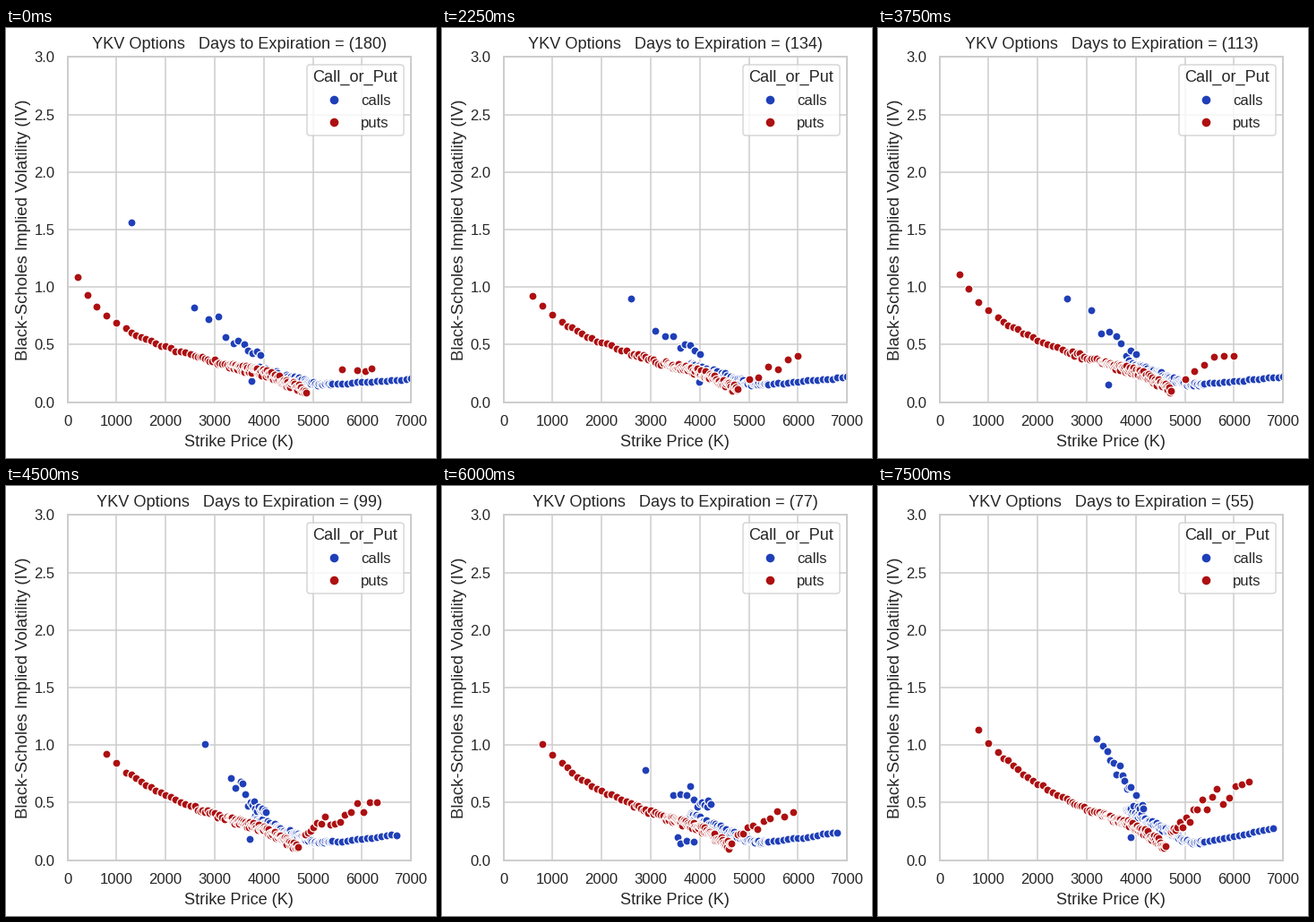
Animation, 480 px wide and 480 px high, one loop 8 s. Source, as a matplotlib script:

```python
import numpy as np
import matplotlib.pyplot as plt
from matplotlib.animation import FuncAnimation
from matplotlib.lines import Line2D

BLUE, RED, INK, GRID = "#1f3fb8", "#ad1011", "0.15", "0.8"
U = 1.086  # style scale in points
STEP_MS, HOLD, FRAMES = 250, 3, 32
SPOT = 4700


def ladder(start, *rungs, thin=1):
    """Strikes from start; each rung is (upper limit, step)."""
    parts = []
    for limit, step in rungs:
        part = np.arange(start, limit, step * thin)
        if part.size:
            parts.append(part)
            start = part[-1] + step * thin
    return np.concatenate(parts)


def jitter(rng, k, far, near):
    """Quotes scatter more as strikes approach the money."""
    size = np.interp(k, (2500, 4000), (far, near))
    return size * rng.uniform(-1, 1, k.size)


def put_skew(rng, left, start, thin):
    top = 4500 + 2.1 * left
    k = ladder(start, (1200, 200), (2600, 100), (3300, 50), (top, 18), thin=thin)
    x = np.log(SPOT / k)
    slope = 0.345 * (180 / left) ** 0.42
    dip = 0.09 * np.clip((k - 4000) / (top - 4000), 0, 1)
    return k, 0.2 + slope * x - 0.021 * x**2 - dip + jitter(rng, k, 0.012, 0.034)


def call_smile(rng, left, end, thin):
    k = ladder(3800, (5000, 20), (5400, 25), (end + 1, 100), thin=thin)
    falling = 0.115 * (180 / left) ** 0.6 * np.clip((5050 - k) / 1000, 0, None)
    rising = 0.04 * 180 / left * (np.clip(k - 5300, 0, None) / 1600) ** 1.2
    size = np.interp(k, (4600, 5500), (0.024, 0.005))
    return k, 0.157 + falling + rising + size * rng.uniform(-1, 1, k.size)


def arc(rng, n, k0, v0, k1, v1, crowd):
    """Stray quotes from one point to another; crowd < 1 packs the far end."""
    t = np.linspace(0, 1, n) ** crowd
    k = np.round((k0 + (k1 - k0) * t) / 25) * 25
    v = v1 + (v0 - v1) * (1 - t) ** 1.3
    rough = 0.12 * np.sin(np.pi * t) ** 0.5
    return k, v * (1 + rough * rng.uniform(-1.5, 1.5, n))


def by_strike(*parts):
    pts = np.hstack(parts).T
    return pts[np.argsort(pts[:, 0], kind="stable")]


def day(left, start, end=7000, thin=1, lows=1,
        high=(9, 2600, 0.9, 4000, 0.42, 0.5),
        wing=(6, 5000, 0.2, 6000, 0.4, 1)):
    rng = np.random.default_rng(left)
    low = rng.uniform(3400, 4000, lows), rng.uniform(0.14, 0.21, lows)
    calls = by_strike(call_smile(rng, left, end, thin), arc(rng, *high), low)
    puts = by_strike(put_skew(rng, left, start, thin), arc(rng, *wing))
    return left, calls, puts


days = [
    day(180, 200, high=(12, 1300, 1.56, 3920, 0.41, 0.3),
        wing=(4, 5600, 0.283, 6200, 0.293, 0.6)),
    day(168, 200),
    day(155, 200, lows=4, high=(13, 800, 1.59, 3750, 0.39, 0.5),
        wing=(11, 5030, 0.19, 5800, 0.355, 1)),
    day(134, 600),
    day(120, 1600, end=6000, thin=2, lows=0,
        high=(5, 3920, 0.38, 4250, 0.31, 1),
        wing=(3, 4520, 0.155, 4680, 0.13, 1)),
    day(113, 400),
    day(99, 800, end=6700, high=(20, 2800, 1.005, 4050, 0.42, 0.3),
        wing=(18, 4800, 0.22, 6300, 0.505, 1.6)),
    day(90, 400, lows=4, high=(58, 1000, 1.95, 4050, 0.42, 0.7),
        wing=(17, 4740, 0.27, 6900, 0.375, 2.5)),
    day(77, 800, end=6800, lows=4, high=(13, 2900, 0.785, 4225, 0.485, 0.35),
        wing=(11, 4780, 0.22, 5900, 0.42, 1.5)),
    day(62, 600),
    day(55, 800, end=6800, high=(18, 3200, 1.055, 4160, 0.45, 0.7),
        wing=(21, 4720, 0.24, 6300, 0.685, 1.8)),
]

plt.rcParams["font.family"] = "Liberation Sans"
fig = plt.figure(figsize=(4.8, 4.8), dpi=100, facecolor="white")
ax = fig.add_axes((68.6 / 480, 62.5 / 480, 383.5 / 480, 385.2 / 480))
ax.set(xlim=(0, 7000), ylim=(0, 3))
ax.set_axisbelow(True)
ax.grid(color=GRID, linewidth=U)
ax.tick_params(bottom=False, left=False, length=6 * U, pad=3.5 * U,
               labelsize=11 * U, labelcolor=INK)
for spine in ax.spines.values():
    spine.set(color=GRID, linewidth=1.25 * U)

ax.set_xlabel("Strike Price (K)", labelpad=4.5 * U, fontsize=12 * U, color=INK)
ax.set_ylabel("Black-Scholes Implied Volatility (IV)", labelpad=2.2 * U,
              fontsize=12.35 * U, color=INK)
title = ax.set_title("", pad=6 * U, fontsize=12 * U, color=INK)


def cloud(color, z):
    return ax.scatter([], [], s=(6 * U) ** 2, color=color, edgecolors="white",
                      linewidths=0.8 * U, zorder=z)


def key(color, name):
    return Line2D([], [], linestyle="", marker="o", markersize=6.4 * U,
                  color=color, markeredgewidth=0, label=name)


calls, puts = cloud(BLUE, 2.1), cloud(RED, 2.2)
legend = ax.legend(handles=[key(BLUE, "calls"), key(RED, "puts")],
                   title="Call_or_Put", loc="upper right", fontsize=11 * U,
                   title_fontsize=12 * U, labelspacing=0.58,
                   labelcolor=INK, edgecolor=GRID)
legend.get_title().set_color(INK)
legend.get_frame().set_linewidth(U)


def draw(i):
    left, call_pts, put_pts = days[min(i // HOLD, len(days) - 1)]
    calls.set_offsets(call_pts)
    puts.set_offsets(put_pts)
    title.set_text(f"YKV Options   Days to Expiration = ({left})")
    return calls, puts, title


anim = FuncAnimation(fig, draw, frames=FRAMES, interval=STEP_MS,
                     init_func=lambda: draw(0), repeat=True, repeat_delay=0)
plt.show()
```
